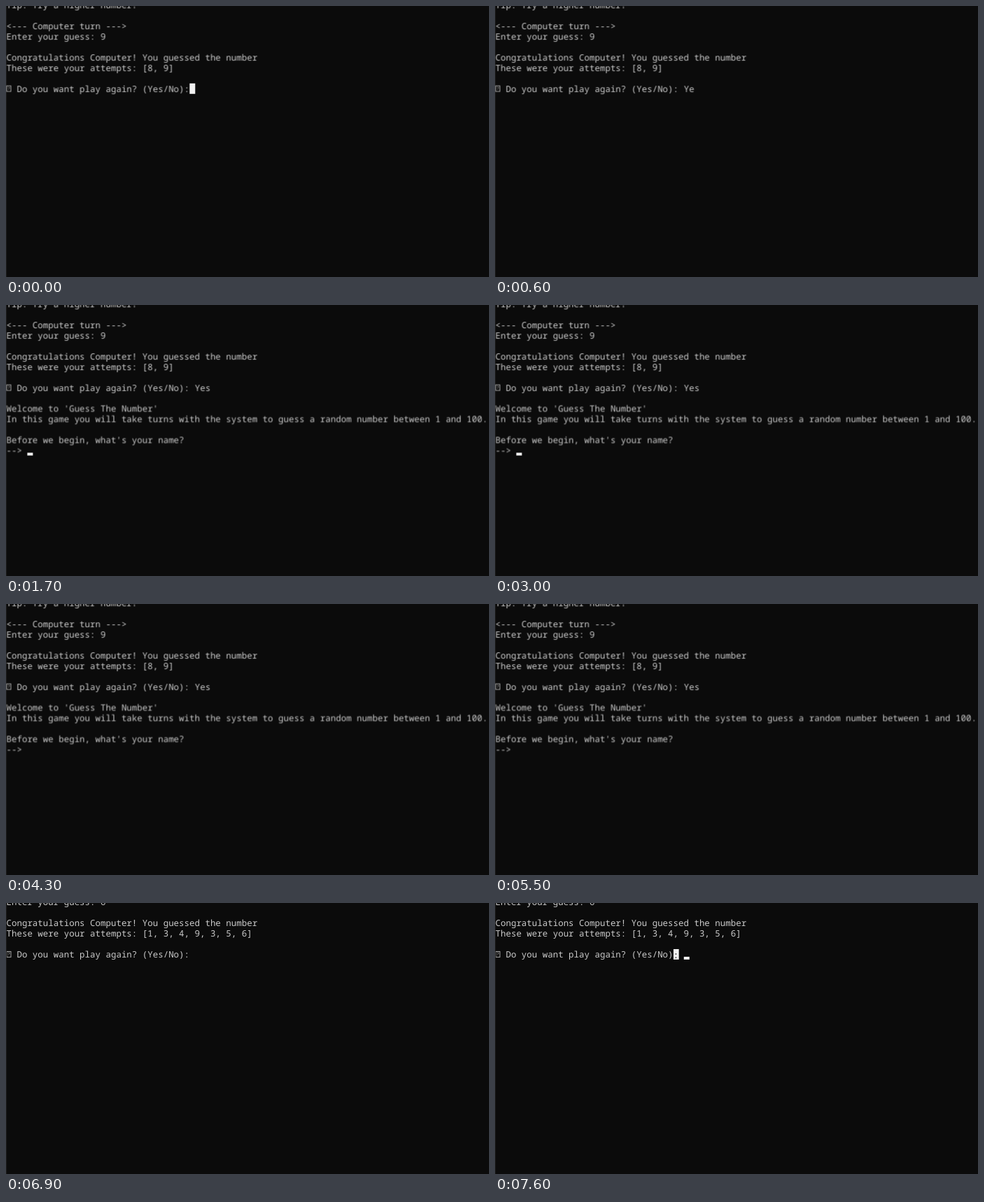
An HTML page for the animation above (8 s loop, 690 by 388 pixels).

```html
<!DOCTYPE html>
<html lang="en">
<head>
<meta charset="utf-8">
<title>Guess The Number</title>
<style>
:root { --w: 7.48px; --h: 14.95px; }
html, body { margin: 0; width: 100%; height: 100%; overflow: hidden; background: #0b0b0b; }
#stage {
  position: relative; width: 690px; height: 388px; overflow: hidden;
  background: #0b0b0b; box-shadow: inset 1px 0 #1d1d1d;
  font: 12.467px/14.95px "Noto Sans Mono", "DejaVu Sans Mono", monospace;
  text-rendering: geometricPrecision; color: #cbcbcb;
}
/* Character grid: column 0, row 0 starts just above the stage */
#grid { position: absolute; left: 0; top: 0; transform: translate(.5px, -7.8px); }
pre { margin: 0; font: inherit; }
pre, #grid i, #grid b { position: absolute; left: 0; top: 0; font-style: normal; font-weight: 400; }
.at { transform: translate(calc(var(--c, 0) * var(--w)), calc(var(--r) * var(--h))); }

.icon {
  box-sizing: border-box; width: 7px; height: 9px; margin-top: 2px;
  border: 1px solid #a8a8a8; font-size: 6px; line-height: 7px; text-align: center;
}
.block { width: 8px; height: 15px; margin-top: -1px; line-height: 17px; background: #f2f2f2; color: #0b0b0b; }
.cursor { width: 8px; height: 4px; margin-top: 10px; background: #f2f2f2; }
.typed { overflow: hidden; width: 0; }

.first, .second, .intro, .typed, .cursor, .block { animation: 8s step-end infinite; }
.first { animation-name: first; }
.second { animation-name: second; }
.intro { animation-name: intro; }
.typed { animation-name: typed; }
.cursor { animation-name: cursor; }
.block { animation-name: blockA; }
.block.late { animation-name: blockB; }

@keyframes first { 0% { opacity: 1 } 70%, to { opacity: 0 } }
@keyframes second { 0% { opacity: 0 } 70%, to { opacity: 1 } }
@keyframes intro { 0% { opacity: 0 } 21.25%, to { opacity: 1 } }
@keyframes blockA { 0% { opacity: 1 } 3.75%, to { opacity: 0 } }
@keyframes blockB { 0% { opacity: 0 } 93.75%, to { opacity: 1 } }
@keyframes typed {
  0% { width: 0 }
  3.75% { width: var(--w) }
  7.5% { width: calc(2 * var(--w)) }
  10%, to { width: calc(3 * var(--w)) }
}
@keyframes cursor {
  0%, 7.5%, 15%, 27.5%, 41.25%, 53.75%, 67.5% { opacity: 0 }
  1.25%, 3.75%, 10%, 21.25%, 35%, 47.5%, 61.25%, 95%, to { opacity: 1 }
  0%, 1.25% { translate: calc(36 * var(--w)) calc(8 * var(--h)) }
  3.75% { translate: calc(37 * var(--w)) calc(8 * var(--h)) }
  10% { translate: calc(39 * var(--w)) calc(8 * var(--h)) }
  21.25% { translate: calc(4 * var(--w)) calc(14 * var(--h)) }
  95%, to { translate: calc(36 * var(--w)) calc(5 * var(--h)) }
}
</style>
</head>
<body>
<div id="stage">
  <div id="grid">
    <div class="first">
<pre>Tip: Try a higher number!

&lt;--- Computer turn ---&gt;
Enter your guess: 9

Congratulations Computer! You guessed the number
These were your attempts: [8, 9]

  Do you want play again? (Yes/No):</pre>
      <i class="icon at" style="--r:8">?</i>
      <div class="at" style="--c:36;--r:8"><pre class="typed">Yes</pre></div>
      <div class="at" style="--r:10"><pre class="intro">Welcome to 'Guess The Number'
In this game you will take turns with the system to guess a random number between 1 and 100.

Before we begin, what's your name?
--&gt;</pre></div>
    </div>
    <div class="second">
<pre>Enter your guess: 6

Congratulations Computer! You guessed the number
These were your attempts: [1, 3, 4, 9, 3, 5, 6]

  Do you want play again? (Yes/No):</pre>
      <i class="icon at" style="--r:5">?</i>
    </div>
    <b class="block at" style="--c:35;--r:8"></b>
    <b class="block late at" style="--c:34;--r:5">:</b>
    <b class="cursor"></b>
  </div>
</div>
</body>
</html>
```
